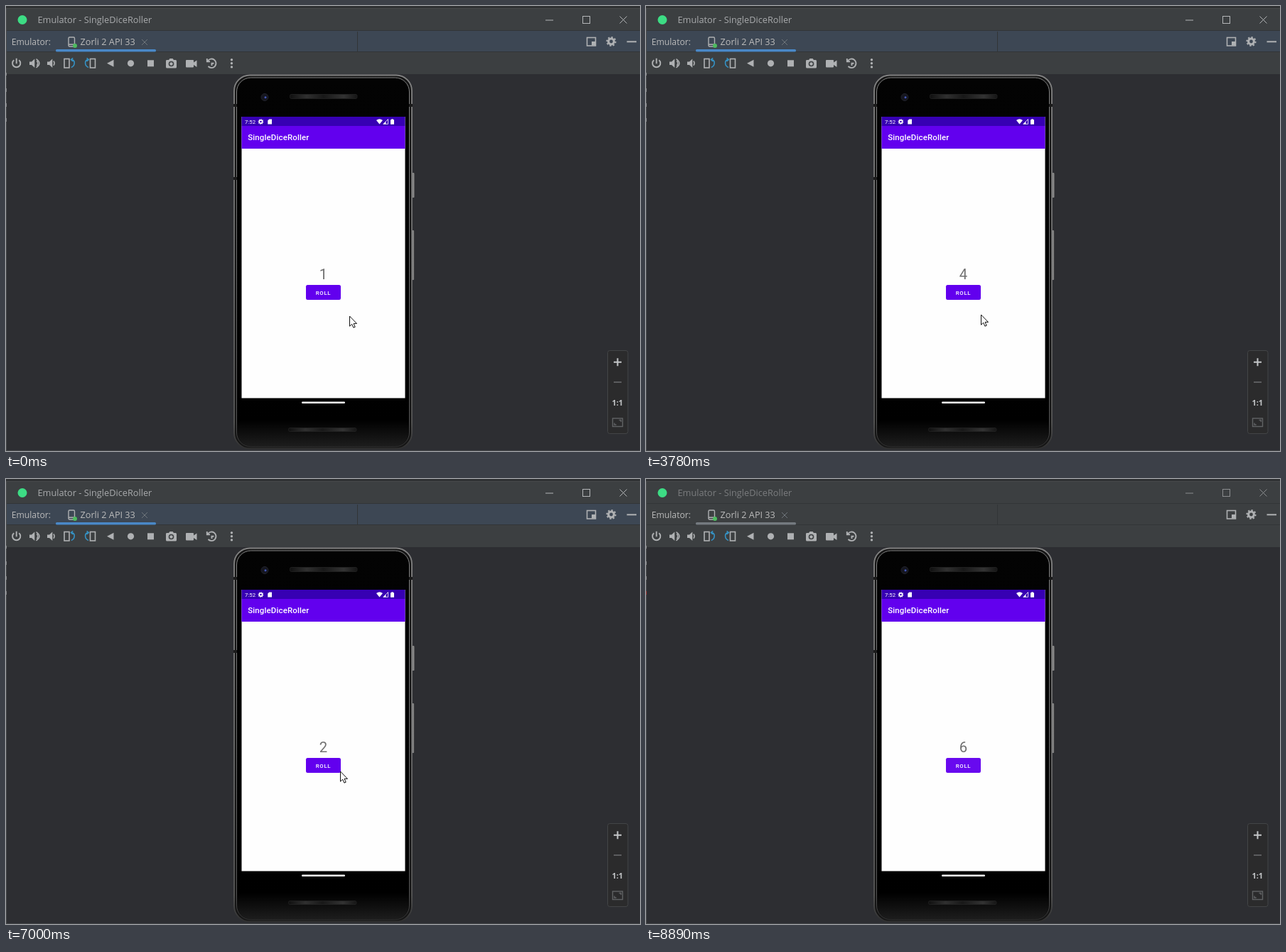
Animation of 892x627 px, one loop 9030 ms. Source, as an HTML page:

```html
<!DOCTYPE html>
<html lang="en">
<head>
<meta charset="utf-8">
<title>Dice roller in an emulator</title>
<style>
html, body { margin: 0; width: 100%; height: 100%; overflow: hidden; background: #2d2e32; }
svg { display: block; width: 892px; height: 627px; }
.ui { font-family: "Open Sans", "Noto Sans", sans-serif; fill: #bbbbbb; }
.app { font-family: Roboto, sans-serif; fill: #fff; }
.med { font-weight: 500; }
.line { fill: none; stroke: #afb1b3; stroke-width: 1.6; }
.fill { fill: #afb1b3; }
.blue { fill: none; stroke: #3592c4; stroke-width: 1.6; }
#title { fill: #a9abad; }
#tabs { fill: #3d4754; }
#mark { fill: #4a88c7; }
.idle #title { fill: #7b7d7f; }
.idle #tabs { fill: #3c3f41; }
.idle #mark { fill: #747a80; }
.idle #winbtns { stroke: #8b8d8f; }
.idle #tick { fill: #a03c3c; }
</style>
</head>
<body>
<svg id="stage" viewBox="0 0 892 627">
  <defs>
    <linearGradient id="rim" x2="0" y2="1">
      <stop offset="0" stop-color="#828282"/><stop offset=".5" stop-color="#6c6c6c"/>
      <stop offset=".93" stop-color="#555"/><stop offset="1" stop-color="#303030"/>
    </linearGradient>
    <linearGradient id="glass" x2="0" y2="1">
      <stop offset="0" stop-color="#030303"/><stop offset=".93" stop-color="#000"/>
      <stop offset="1" stop-color="#1c1c1c"/>
    </linearGradient>
    <linearGradient id="key" x2="1" y2="0">
      <stop offset="0" stop-color="#333"/><stop offset=".6" stop-color="#999"/>
      <stop offset="1" stop-color="#444"/>
    </linearGradient>
    <linearGradient id="slot" x2="1" y2="0">
      <stop offset="0" stop-color="#101010"/><stop offset=".25" stop-color="#303030"/>
      <stop offset=".5" stop-color="#181818"/><stop offset=".8" stop-color="#333"/>
      <stop offset="1" stop-color="#151515"/>
    </linearGradient>
    <filter id="soft" x="-30%" y="-50%" width="160%" height="200%"><feGaussianBlur stdDeviation="1.8"/></filter>
    <clipPath id="pad"><rect x="422" y="393" width="49" height="21" rx="2.3"/></clipPath>
  </defs>

  <!-- window -->
  <rect width="892" height="627" fill="#2d2e32"/>
  <rect width="892" height="96" fill="#3c3f41"/>
  <rect width="892" height="3" fill="#2f3133"/>
  <rect y="3" width="892" height="1" fill="#484a4c"/>
  <rect id="tabs" y="35" width="892" height="29.5"/>
  <path d="M0 34.5H892M0 64.5H892M494.5 36V64" stroke="#323537"/>
  <path d="M.5 4V627" stroke="#484a4c"/>
  <path d="M0 626.5H892" stroke="#444648"/>
  <g fill="#85878a">
    <rect y="94" width="1" height="4"/><rect y="116" width="1" height="5"/>
    <rect y="137" width="1" height="5"/><rect id="tick" y="158" width="1" height="5"/>
  </g>
  <circle cx="23" cy="19.5" r="6.5" fill="#3ddc84"/>
  <text id="title" class="ui" x="44.5" y="24.4" font-size="12.75">Emulator - SingleDiceRoller</text>
  <g id="winbtns" fill="none" stroke="#b4b6b8">
    <path d="M759 20H770M863.5 14.5L873.5 24.5M873.5 14.5L863.5 24.5"/>
    <rect x="811.5" y="14.5" width="10" height="10"/>
  </g>

  <!-- tab row -->
  <text class="ui" x="7.7" y="55" font-size="12.2">Emulator:</text>
  <text class="ui" x="104.5" y="55" font-size="12.7">Zorli 2 API 33</text>
  <rect id="mark" x="70" y="61" width="141" height="3.5" rx="1.5"/>
  <path d="M191 47L199 55M199 47L191 55" stroke="#70767c"/>
  <rect class="line" x="88" y="44" width="8.5" height="13" rx="1.5" style="stroke-width:1.4"/>
  <path class="line" d="M88 54.2H96"/>
  <circle cx="97" cy="56" r="3" fill="#4dbb5f"/>
  <rect class="line" x="817.5" y="44.5" width="12" height="11.5"/>
  <rect class="fill" x="824" y="50" width="5" height="5.5"/>
  <g id="gearTab"></g>
  <rect class="fill" x="873.5" y="49.3" width="13.5" height="2"/>

  <!-- tool row -->
  <path class="line" d="M11.2 76.3A5.6 5.6 0 1 0 18.2 76.3M14.7 73.8V81.2" style="stroke-width:1.9"/>
  <g id="speakers"></g>
  <path class="line" d="M43.3 77.3Q46.2 80.7 43.3 84.2M42.5 74.6Q51.2 80.7 42.5 86.8"/>
  <path class="line" d="M66.8 77.6Q69.4 80.7 66.8 83.8"/>
  <rect class="line" x="82" y="74.5" width="7" height="12.5"/>
  <path class="blue" d="M92 75.6Q96.5 76 96.2 80.5T91.8 86.4M94.2 73.4L91.5 75.6L94.2 78"/>
  <rect class="line" x="118.5" y="74.5" width="7" height="12.5"/>
  <path class="blue" d="M115.8 75.6Q111.3 76 111.6 80.5T116 86.4M113.6 73.4L116.3 75.6L113.6 78"/>
  <path class="fill" d="M142 80.7L151.5 75.7V85.8Z"/>
  <circle class="fill" cx="175.5" cy="80.8" r="4.6"/>
  <rect class="fill" x="199" y="76.3" width="9" height="9"/>
  <path class="fill" fill-rule="evenodd" d="M226 76H229L230.5 74H234.5L236 76H238.5Q240 76 240 77.5V86Q240 87.5 238.5 87.5H226.500Q225 87.5 225 86V77.500Q225 76 226 76ZM232.500 77.700A3.800 3.800 0 1 0 232.500 85.300A3.800 3.800 0 1 0 232.500 77.700Z"/>
  <circle class="fill" cx="232.5" cy="81.5" r="2.2"/>
  <path class="fill" d="M254 76H263Q264 76 264 77V79.500L268.500 76.500V86L264 83V85.500Q264 86.500 263 86.500H254Q253 86.500 253 85.500V77Q253 76 254 76Z"/>
  <path class="line" d="M283.8 77.5A6.300 6.300 0 1 1 284.500 85M282.800 74V78.300H287M289.500 84V80.700H292.500" style="stroke-width:1.9"/>
  <g class="fill"><circle cx="317.500" cy="75.700" r="1.700"/><circle cx="317.500" cy="80.800" r="1.700"/><circle cx="317.500" cy="85.900" r="1.700"/></g>

  <!-- zoom panel -->
  <rect x="846.500" y="485.500" width="28.500" height="117" rx="3" fill="#2b2b2c" stroke="#434547"/>
  <path d="M855 501.700H866M860.500 496.200V507.200" stroke="#c4c6c8" stroke-width="2"/>
  <path d="M855 530H866" stroke="#616365" stroke-width="1.800"/>
  <text class="ui" x="860.300" y="562.800" font-size="11" font-weight="700" text-anchor="middle" style="fill:#c4c6c8">1:1</text>
  <g fill="none" stroke="#616365" stroke-width="1.400">
    <rect x="853.500" y="581" width="14" height="11.500"/>
    <path d="M856 587.500V590H858.700M862.500 583.500H865.200V586"/>
  </g>

  <!-- phone -->
  <rect x="570" y="235" width="5" height="35" rx="1.500" fill="url(#key)"/>
  <rect x="570" y="316" width="4.500" height="70" rx="1.500" fill="url(#key)"/>
  <rect x="321" y="97.500" width="250" height="526" rx="22" fill="#151515" stroke="url(#rim)" stroke-width="1.800"/>
  <rect x="324.500" y="101" width="243" height="520" rx="20" fill="url(#glass)" stroke="url(#rim)" stroke-width="1"/>
  <rect x="326.500" y="103" width="239" height="516" rx="18" fill="url(#glass)"/>
  <path d="M320 140H325M567 140H572M320 243H325" stroke="#1b1b1b" stroke-width="4"/>
  <circle cx="364" cy="128.500" r="5" fill="#15161f" stroke="#22232b"/>
  <circle cx="365" cy="128.800" r="1.500" fill="#4257b5"/>
  <g fill="url(#slot)" stroke="#242424" stroke-width=".8">
    <rect x="399.500" y="124.500" width="94.500" height="6" rx="2"/>
    <rect x="397.500" y="594.500" width="95.500" height="5" rx="2"/>
  </g>
  <rect x="331.500" y="156" width="230" height="396.500" fill="#fefefe"/>
  <rect x="331.500" y="156" width="230" height="13" fill="#3700b3"/>
  <rect x="331.500" y="169" width="230" height="32" fill="#6200ee"/>
  <rect x="416" y="557.500" width="61" height="2.400" rx="1.200" fill="#fff"/>
  <text class="app" x="336" y="165.800" font-size="7.800">7:52</text>
  <g id="gearBar"></g>
  <g fill="#fff">
    <path d="M370.200 159.500H374V166.500H368.300V161.500Z"/>
    <path d="M521 161Q525.500 157.500 530 161L525.500 166.500Z"/>
    <path d="M537.500 159.500V166.300H530.800Z" fill="none" stroke="#fff" stroke-width=".8"/>
    <path d="M534.500 163V166.300H531Z"/>
    <path d="M541 160.200H542.300V159.300H544.700V160.200H546V166.800H541Z"/>
  </g>
  <text class="app med" x="340.200" y="189.300" font-size="11.500" letter-spacing=".12">SingleDiceRoller</text>

  <!-- dice app -->
  <text id="digit" class="app" x="446.500" y="384.600" font-size="20.300" text-anchor="middle" style="fill:#717171">1</text>
  <rect id="shadow" x="422.500" y="395.500" width="48" height="21" rx="3" fill="#000" opacity=".4" filter="url(#soft)"/>
  <rect x="422" y="393" width="49" height="21" rx="2.300" fill="#6200ee"/>
  <g clip-path="url(#pad)"><circle id="ripple" r="60" fill="#fff"/></g>
  <text class="app med" x="435.700" y="406.500" font-size="7.840" letter-spacing=".7">ROLL</text>

  <path id="cursor" d="M0 0V14.200L3.200 11.200L5.400 16.200L7.700 15.200L5.600 10.400H10Z" fill="#fff" stroke="#111" stroke-width="1" stroke-linejoin="round"/>
</svg>
<script>
const LOOP = 9030;
const $ = id => document.getElementById(id);

function gear(x, y, r, color) {
  const ring = (k, w, dash) => `<circle cx="${x}" cy="${y}" r="${r * k}" fill="none" stroke="${color}"
    stroke-width="${r * w}" pathLength="16" ${dash ? 'stroke-dasharray="1 1"' : ''}/>`;
  return ring(.56, .44) + ring(.87, .28, true);
}
$('gearTab').innerHTML = gear(851.5, 50, 7, '#afb1b3');
$('gearBar').innerHTML = gear(358.5, 163, 3.8, '#fff');
$('speakers').innerHTML = [33, 58].map(x =>
  `<path class="fill" d="M${x} 78.5h3l4.300 -4v12.500l-4.300 -4h-3z"/>`).join('');

// pointer stops: time, x, y
const path = [
  [0, 483.5, 437], [120, 485.5, 447], [260, 479, 440], [390, 466, 427], [530, 453, 416], [660, 446.5, 410.5],
  [1460, 459, 423], [1600, 477, 442], [1740, 475, 439], [1880, 466, 426], [2020, 458, 413], [2140, 454.5, 409],
  [3110, 488, 446], [3260, 526, 493],
  [3540, 517, 483], [3660, 494, 458], [3780, 471.5, 435], [3900, 455, 416], [4020, 444.5, 404.5],
  [4790, 465, 422], [4920, 487, 443], [5050, 497, 451], [5200, 481, 440], [5350, 459.5, 422],
  [5470, 452, 413], [5600, 447, 407], [5720, 444.5, 404.5],
  [6550, 476, 425], [6700, 499, 445], [6850, 488, 431], [7000, 470.5, 412], [7270, 453.5, 410],
  [8210, 500, 448], [8330, 647, 586], [8450, -40, -40]
];

// clicks: press, new value shown, lowered, ripple gone, value
const clicks = [
  [1050, 1190, 1460, 1600, 2], [2700, 2840, 3110, 3260, 4], [4390, 4520, 4790, 5200, 6],
  [6120, 6260, 6550, 6700, 2], [7640, 7770, 8210, LOOP, 6]
];

const last = (list, t, k = 0) => list.filter(e => e[k] <= t).pop();

function draw(t) {
  const [, x, y] = last(path, t);
  const rolled = last(clicks, t, 1);
  const click = last(clicks, t);
  $('cursor').setAttribute('transform', `translate(${x} ${y})`);
  $('digit').textContent = rolled ? rolled[4] : 1;

  const raised = click && t < click[2];
  const glow = !click || t >= click[3] ? 0 : !raised ? .035 : t < click[1] ? .06 : .1;
  $('shadow').style.display = raised ? '' : 'none';
  $('ripple').setAttribute('cx', x);
  $('ripple').setAttribute('cy', y);
  $('ripple').setAttribute('r', raised ? (t < click[1] ? 14 : 60) : 2000);
  $('ripple').setAttribute('opacity', glow);
  $('stage').classList.toggle('idle', t >= 8890);
}

const start = performance.now();
function tick() {
  draw((performance.now() - start) % LOOP);
  requestAnimationFrame(tick);
}
tick();
</script>
</body>
</html>
```
